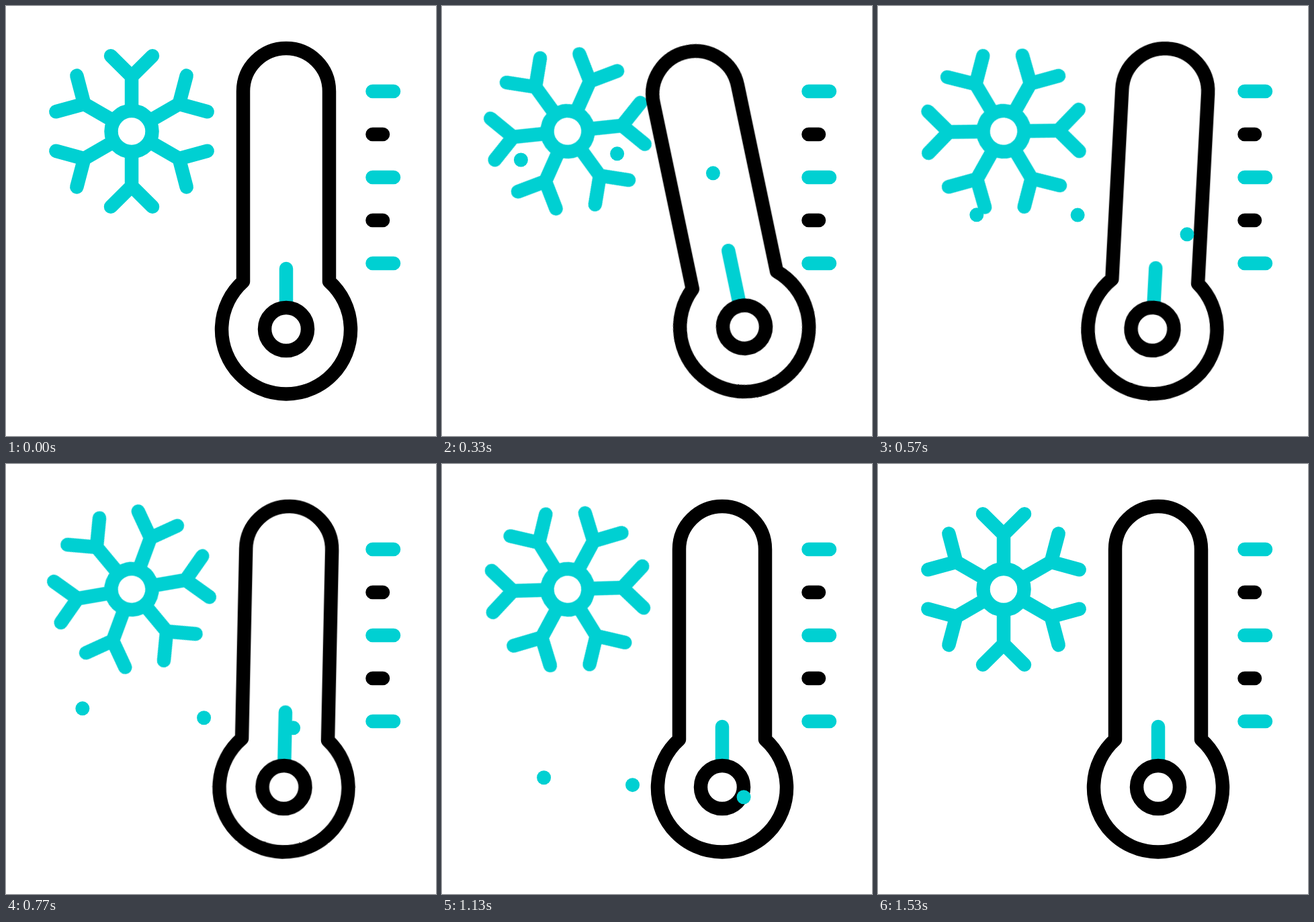
Animation of 640x640 px, one loop 1670 ms. Source, as an HTML page without scripts:

```html
<!DOCTYPE html>
<html lang="en">
<head>
<meta charset="utf-8">
<title>Freezing thermometer</title>
<style>
  html, body { margin: 0; width: 100%; height: 100%; overflow: hidden; background: #fff; }
  svg { display: block; width: 100%; height: 100%; fill: none; stroke: #000; stroke-width: 20.5;
        stroke-linecap: round; stroke-linejoin: round; }
  .cold { stroke: #00d0d2; }
  .dot { fill: #00d0d2; stroke: none; }

  .flake, .meter, .level, .dot {
    animation: 1.67s cubic-bezier(.333, 0, .667, 1) infinite;
  }
  .flake { transform-origin: 187px 186.5px; animation-name: spin; }
  .meter { transform-origin: 417px 320px; animation-name: swing; }
  .level { animation-name: bob; }

  /* sideways drift, steady fall, and appearing */
  .dot { animation-timing-function: cubic-bezier(.333, 0, .667, 1), linear, linear; }
  .left { animation-name: drift-left, fall-left, show; }
  .middle { animation-name: drift-middle, fall-middle, show; }
  .right { animation-name: drift-right, fall-right, show; }

  @keyframes spin {
    0% { transform: rotate(0deg); }
    22%, 29% { transform: rotate(-37deg); }
    80%, 100% { transform: rotate(180deg); }
  }
  @keyframes swing {
    0% { transform: rotate(0deg); }
    20% { transform: rotate(-11.85deg); }
    37% { transform: rotate(4.2deg); }
    58% { transform: rotate(-3.1deg); }
    67%, 100% { transform: rotate(0deg); }
  }
  @keyframes bob {
    0%, 36%, 61%, 100% { transform: translateY(0); }
    20% { transform: translateY(-26px); }
    48% { transform: translateY(-23px); }
  }
  @keyframes show {
    0%, 6% { r: 0; }
    13%, 83% { r: 10.5px; }
    91%, 100% { r: 0; }
  }

  @keyframes drift-left {
    0%, 16% { cx: 113px; }
    33% { cx: 147.5px; }
    47% { cx: 113.5px; }
    69% { cx: 152px; }
    92%, 100% { cx: 120px; }
  }
  @keyframes fall-left {
    0%, 8% { cy: 160px; }
    20% { cy: 230px; }
    34% { cy: 310px; }
    46% { cy: 363px; }
    58% { cy: 422px; }
    68% { cy: 468px; }
    92%, 100% { cy: 578px; }
  }
  @keyframes drift-middle {
    0%, 16% { cx: 257.5px; }
    40% { cx: 304px; }
    59% { cx: 266px; }
    80% { cx: 313px; }
    92%, 100% { cx: 300px; }
  }
  @keyframes fall-middle {
    0%, 8% { cy: 145px; }
    20% { cy: 221px; }
    34% { cy: 310px; }
    46% { cy: 377px; }
    58% { cy: 431px; }
    68% { cy: 479px; }
    92%, 100% { cy: 592px; }
  }
  @keyframes drift-right {
    0%, 16% { cx: 396px; }
    34% { cx: 460px; }
    52% { cx: 417px; }
    74% { cx: 457px; }
    92%, 100% { cx: 425px; }
  }
  @keyframes fall-right {
    0%, 8% { cy: 174px; }
    20% { cy: 250px; }
    34% { cy: 339px; }
    46% { cy: 392px; }
    58% { cy: 451px; }
    68% { cy: 497px; }
    92%, 100% { cy: 604px; }
  }
</style>
</head>
<body>
<svg viewBox="0 0 640 640">
  <defs>
    <path id="arm" d="M187 150V105M156 74.3L187 105L218 74.3"/>
    <g id="arms">
      <use href="#arm"/>
      <use href="#arm" transform="rotate(60 187 186.5)"/>
      <use href="#arm" transform="rotate(120 187 186.5)"/>
    </g>
  </defs>

  <g class="cold flake">
    <use href="#arms"/>
    <use href="#arms" transform="rotate(180 187 186.5)"/>
    <circle cx="187" cy="186.5" r="30.5"/>
  </g>

  <path class="cold" d="M545.5 127H577M545.5 255H577M545.5 383H577"/>
  <path d="M545.5 191H561M545.5 319H561"/>

  <g class="meter">
    <path d="M353 410V127a64 64 0 0 1 128 0V410A96 96 0 1 1 353 410Z"/>
    <path class="cold level" d="M417 391V470"/>
    <circle cx="417" cy="481" r="32" fill="#fff"/>
  </g>

  <circle class="dot left"/>
  <circle class="dot middle"/>
  <circle class="dot right"/>
</svg>
</body>
</html>
```
